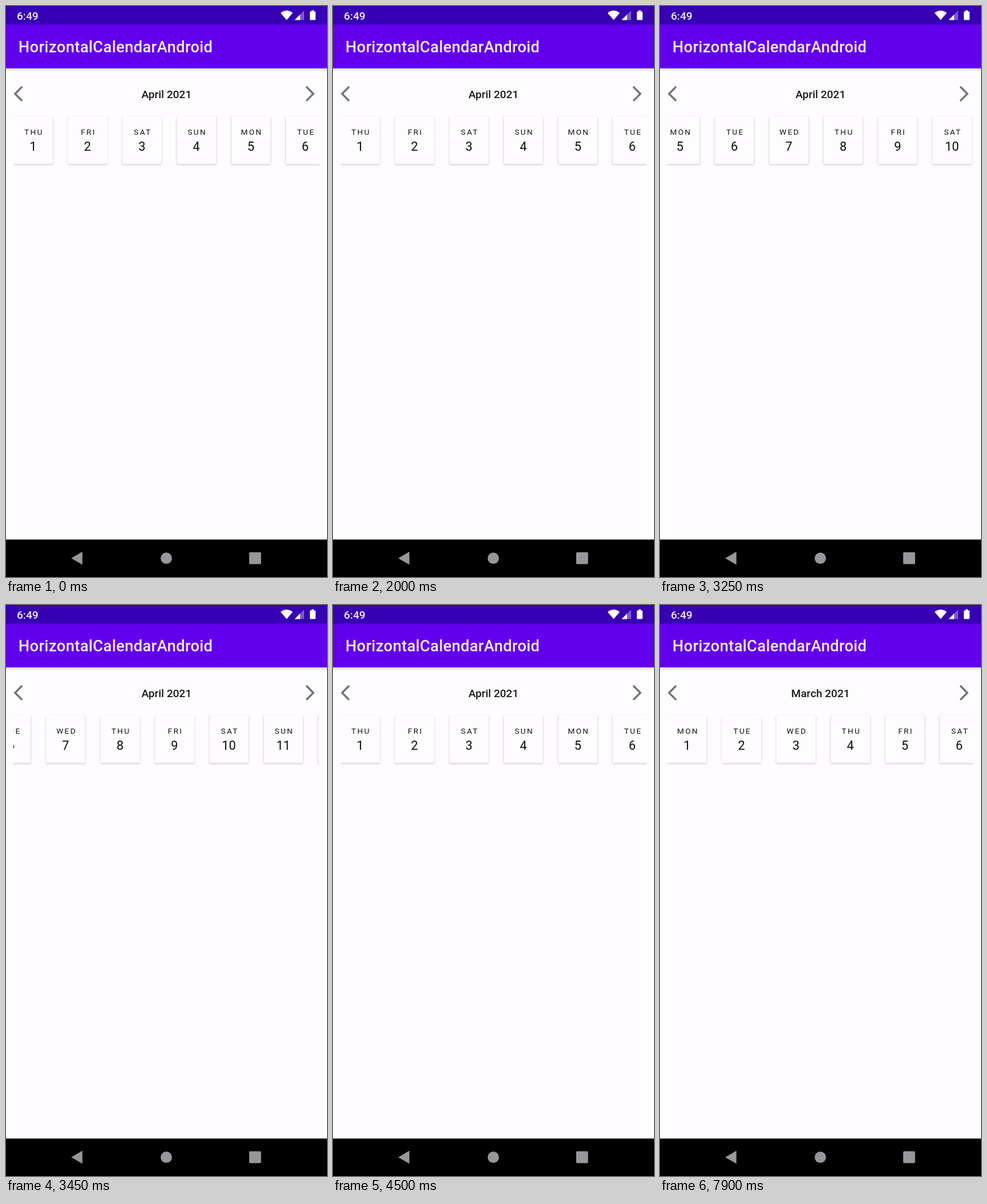
Recreate the animation shown at these times as an HTML page. Size 561 px wide and 998 px high, loop 8000 ms.

```html
<!DOCTYPE html>
<html lang="en">
<head>
<meta charset="utf-8">
<title>Horizontal calendar</title>
<style>
  html, body { margin: 0; width: 100%; height: 100%; overflow: hidden; background: #fefcff; }
  svg { display: block; }
  #stage { width: 100%; height: 100%; font-family: Roboto, sans-serif; }
  .medium { font-weight: 500; }
  .title { font-size: 27.3px; letter-spacing: .0125em; fill: #f6efff; }
  .clock { font-size: 19.1px; fill: #f4effc; }
  .month { font-size: 19.1px; fill: #19181a; text-anchor: middle; }
  .weekday { font-size: 13.65px; letter-spacing: .1667em; text-anchor: middle; fill: #111; }
  .date { font-size: 21.8px; text-anchor: middle; fill: #0c0c0c; }
  .card { fill: #fefcff; filter: drop-shadow(0 0 .7px rgba(0,0,0,.28)) drop-shadow(0 1.4px 1.8px rgba(0,0,0,.2)); }
  .arrow { fill: #747276; }
  .nav { fill: #98969a; }
</style>
</head>
<body>
<svg id="stage" viewBox="0 0 561 998">
  <defs>
    <linearGradient id="shade" x2="0" y2="1">
      <stop stop-color="#000" stop-opacity=".14"/>
      <stop offset="1" stop-color="#000" stop-opacity="0"/>
    </linearGradient>
    <path id="chevron" d="M11.67 3.87 9.9 2.1 0 12l9.9 9.9 1.77-1.77L3.54 12z"/>
  </defs>
  <rect width="561" height="998" fill="#fefcff"/>

  <rect y="109" width="561" height="6" fill="url(#shade)"/>
  <rect y="32" width="561" height="77" fill="#6200ee"/>
  <rect width="561" height="32.5" fill="#3700b3"/>
  <text class="medium clock" x="19" y="24">6:49</text>
  <text class="medium title" x="21.8" y="81.3">HorizontalCalendarAndroid</text>

  <g fill="#fff">
    <path d="M480 12.2Q490.5 4 501 12.2L490.5 24.6Z"/>
    <path d="M504.5 24.5 521 8V24.5Z" opacity=".35"/>
    <path d="M504.5 24.5 514 15V24.5Z"/>
    <path d="M534 7.5h4v2h1.8q1.2 0 1.2 1.2v12.6q0 1.2-1.2 1.2h-7.6q-1.2 0-1.2-1.2V10.7q0-1.2 1.2-1.2h1.8z"/>
  </g>

  <use href="#chevron" class="arrow" transform="translate(13.5 137) scale(1.365)"/>
  <use href="#chevron" class="arrow" transform="translate(539.5 137) scale(-1.365 1.365)"/>
  <text id="month" class="medium month" x="280.5" y="160.5"></text>

  <svg x="13" y="180" width="534.6" height="110" viewBox="13 180 534.6 110">
    <g id="strip"></g>
  </svg>

  <rect y="932.5" width="561" height="65.5" fill="#000"/>
  <g class="nav">
    <path d="M114 965.2 133.5 953.8V976.6Z"/>
    <circle cx="280.2" cy="965.2" r="9.9"/>
    <rect x="425" y="954.8" width="20.8" height="20.8" rx="1.8"/>
  </g>
</svg>
<script>
  const LOOP = 8000, STEP = 50, PITCH = 95.12, CARD_COUNT = 14;
  const WEEKDAYS = ['SUN', 'MON', 'TUE', 'WED', 'THU', 'FRI', 'SAT'];
  const MONTHS = { 2: 'March', 3: 'April', 4: 'May', 5: 'June' };

  // [time, month index]
  const monthChanges = [[0, 3], [5300, 4], [6050, 5], [7200, 4], [7500, 3], [7900, 2]];

  // [time, scroll offset]: a swipe forward with fling, then a fling back to the start
  const scrollKeys = [
    [0, 0], [2850, 0], [2900, 8], [2950, 30], [3000, 68.6], [3050, 135], [3100, 212],
    [3150, 286], [3200, 348], [3300, 438], [3450, 513.8], [3550, 539], [3650, 551], [3700, 552],
    [3900, 552], [3950, 540], [4000, 506], [4050, 452.6], [4100, 365], [4150, 265],
    [4200, 168], [4250, 78], [4300, 0], [LOOP, 0]
  ];

  const strip = document.getElementById('strip');
  const monthLabel = document.getElementById('month');

  function add(parent, tag, attrs, text = '') {
    const node = document.createElementNS('http://www.w3.org/2000/svg', tag);
    for (const name in attrs) node.setAttribute(name, attrs[name]);
    node.textContent = text;
    return parent.appendChild(node);
  }

  const weekdayLabels = Array.from({ length: CARD_COUNT }, (_, i) => {
    const card = add(strip, 'g', { transform: `translate(${12.9 + i * PITCH} 0)` });
    add(card, 'rect', { class: 'card', y: 193, width: 69, height: 83.5, rx: 2.6 });
    const label = add(card, 'text', { class: 'weekday', x: 36, y: 225 });
    add(card, 'text', { class: 'date', x: 34.4, y: 253 }, i + 1);
    return label;
  });

  function scrollAt(time) {
    const i = scrollKeys.findIndex(key => key[0] > time);
    const [t0, a] = scrollKeys[i - 1], [t1, b] = scrollKeys[i];
    return a + (b - a) * (time - t0) / (t1 - t0);
  }

  let shownMonth;
  function showMonth(month) {
    if (month === shownMonth) return;
    shownMonth = month;
    monthLabel.textContent = `${MONTHS[month]} 2021`;
    weekdayLabels.forEach((label, i) => {
      label.textContent = WEEKDAYS[new Date(2021, month, i + 1).getDay()];
    });
  }

  function render() {
    const time = Math.floor(performance.now() % LOOP / STEP) * STEP;
    showMonth(monthChanges.filter(change => change[0] <= time).pop()[1]);
    strip.setAttribute('transform', `translate(${-scrollAt(time)} 0)`);
    requestAnimationFrame(render);
  }
  render();
</script>
</body>
</html>
```
